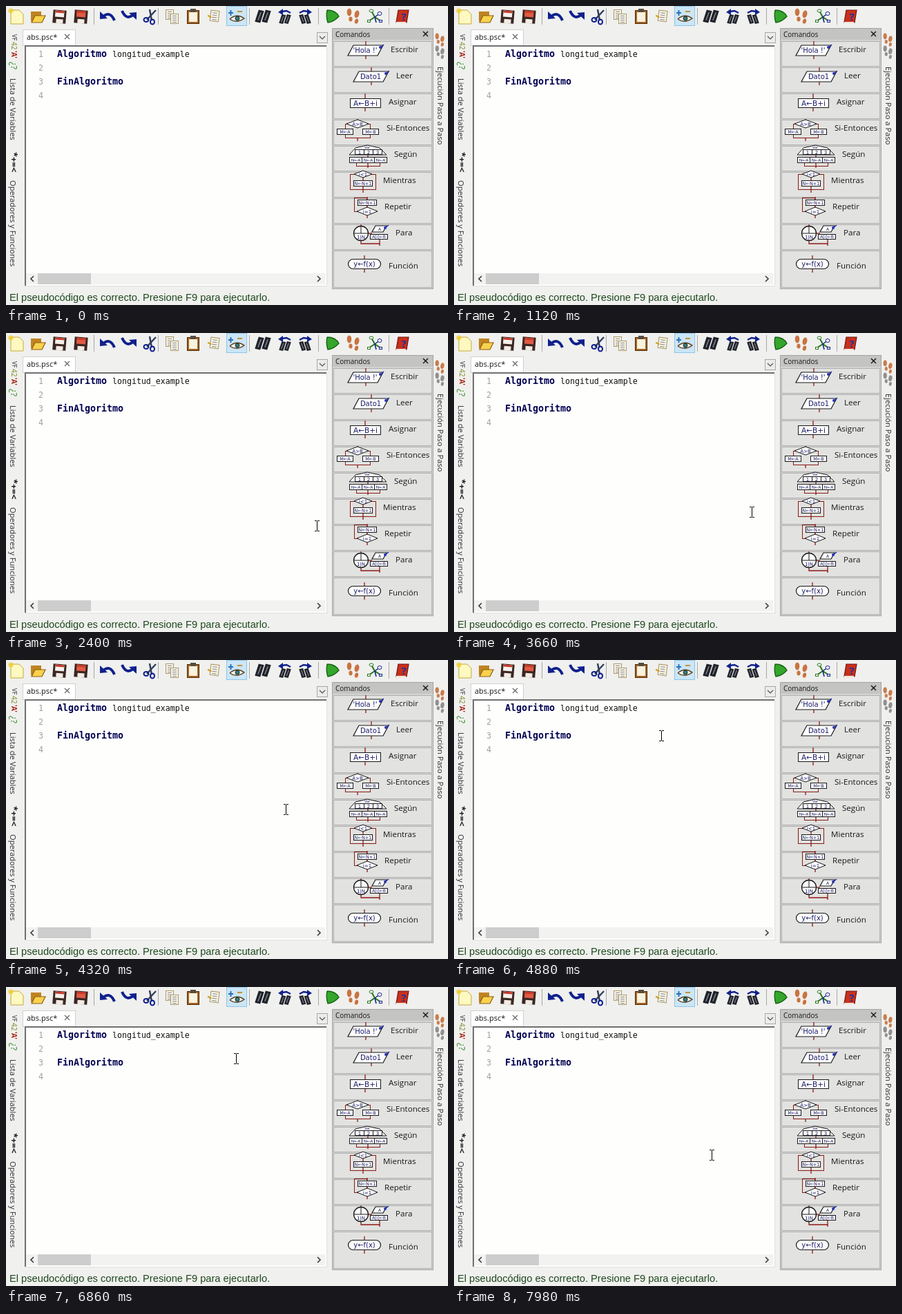
Write an HTML page with a canvas that moves like this. It is 640 px wide and 434 px high and loops after 8000 ms.

```html
<!DOCTYPE html>
<html lang="es">
<head>
<meta charset="utf-8">
<title>Editor de pseudocódigo</title>
<style>
html, body { margin: 0; width: 100%; height: 100%; overflow: hidden; background: #f0f0ee; }
canvas { display: block; width: 640px; height: 434px; }
</style>
</head>
<body>
<canvas id="stage" width="640" height="434"></canvas>
<script>
const ctx = document.getElementById('stage').getContext('2d');
const UI = '"Open Sans", sans-serif';
const MONO = '"DejaVu Sans Mono", monospace';
const ICON = '"DejaVu Sans", sans-serif';
const LOOP = 8000;
const RED = '#8c1a14', NAVY = '#10208c', INK = '#18181c', PAPER = '#fdfdfa';

function box(x, y, w, h, fill, edge) {
  if (fill) { ctx.fillStyle = fill; ctx.fillRect(x, y, w, h); }
  if (edge) { ctx.strokeStyle = edge; ctx.lineWidth = 1; ctx.strokeRect(x + .5, y + .5, w - 1, h - 1); }
}
function paint(fill, edge, width = 1) {
  if (fill) { ctx.fillStyle = fill; ctx.fill(); }
  if (edge) { ctx.strokeStyle = edge; ctx.lineWidth = width; ctx.stroke(); }
}
function trace(p) {
  ctx.beginPath();
  for (let i = 0; i < p.length; i += 2) ctx.lineTo(p[i], p[i + 1]);
}
function line(p, color = INK, width = 1) { trace(p); paint(null, color, width); }
function poly(p, fill, edge, width) { trace(p); ctx.closePath(); paint(fill, edge, width); }
function oval(x, y, rx, ry, fill, edge, width) {
  ctx.beginPath(); ctx.ellipse(x, y, rx, ry, 0, 0, 7); paint(fill, edge, width);
}
function text(s, x, y, size, color = INK, font = UI, weight = '', align = 'left') {
  ctx.font = `${weight} ${size}px ${font}`;
  ctx.fillStyle = color; ctx.textAlign = align;
  ctx.fillText(s, x, y);
}
function at(x, y, draw, turn = 0, sx = 1, sy = sx) {
  ctx.save(); ctx.translate(x, y); ctx.rotate(turn); ctx.scale(sx, sy);
  draw(); ctx.restore();
}
const down = (s, x, y, size = 11.1, color = '#2c2c34', weight = '') =>
  at(x, y, () => text(s, 0, 0, size, color, UI, weight), Math.PI / 2);
const mirror = draw => () => at(0, 0, draw, 0, -1, 1);
const slantBox = (x, y, w, h, lean, fill, edge) =>
  poly([x + lean, y, x + w, y, x + w - lean, y + h, x, y + h], fill, edge, 1.2);

// Toolbar icons, each around its own centre
function page() {
  poly([-8, -9, 4, -9, 10, -3, 10, 11, -8, 11], '#fdf9c0', '#c8a838');
  for (let i = 0; i < 4; i++) at(-8, -8, () => line([-4, 0, 4, 0], '#f0cc30', 1.4), i * Math.PI / 4);
}
function folder() {
  box(-10, -7, 15, 14, '#c08420');
  slantBox(-9, -1, 20, 10, 5, '#f8d24c', '#8c5c10');
}
const disk = label => () => at(0, 0, () => {
  box(-9, -9, 19, 19, '#3a2622');
  box(-6, -8, 13, 9, label);
  box(-6, -8, 13, 3, '#c43a2c');
  box(-4, 4, 10, 6, '#f2ece4');
}, .08);
function undo() {
  ctx.beginPath(); ctx.moveTo(-6, 0); ctx.quadraticCurveTo(4, -8, 10, 6);
  paint(null, NAVY, 4);
  poly([-11, -7, -11, 4, 0, 3], NAVY);
}
const redo = () => at(0, -2, undo, Math.PI);
function scissors() {
  line([8, -9, -5, 5], '#303c5c', 2.4); line([-1, -10, 2, 6], '#303c5c', 2.4);
  oval(-6, 5, 3.5, 3, null, NAVY, 2); oval(3, 8, 3, 3.5, null, NAVY, 2);
}
function sheet(x, y) {
  box(x, y, 12, 15, '#f8f4e0', '#a89870');
  for (let i = 3; i < 13; i += 3) line([x + 3, y + i + .5, x + 9, y + i + .5], '#8484a0');
}
const copy = () => { sheet(-9, -10); sheet(-2, -4); };
const list = () => at(0, 0, () => { sheet(-6, -8); line([-9, 0, -4, 2], '#d0a020', 2); }, .12, 1.1);
function paste() {
  box(-9, -9, 18, 20, '#a8641c', '#4b2808');
  box(-6, -6, 12, 14, '#f8f2e0'); box(-4, -11, 8, 5, '#584c3c');
}
function eye() {
  line([-11, -5, -4, -5], '#2b70b8', 2); line([-7.5, -9, -7.5, -1], '#2b70b8', 2);
  line([2, -7, 9, -7], '#c89030', 2);
  ctx.beginPath(); ctx.moveTo(-9, 4); ctx.quadraticCurveTo(1, -5, 12, 3);
  ctx.quadraticCurveTo(1, 11, -9, 4); paint('#f8f4ea', '#5a4022', 1.4);
  oval(2, 3, 3, 3, '#347c7a', '#18302c');
}
function binoculars() {
  for (const x of [-5, 5]) at(x, 0, () => {
    slantBox(-5, -9, 10, 18, 2, '#20222a');
    line([1, -6, -1, 6], '#868a94', 1.4);
  }, .2);
}
function seek() {
  at(1, 4, binoculars, 0, .75);
  line([9, -5, 3, -8, -3, -7], NAVY, 2.4);
  poly([-9, -6, -2, -11, -2, -2], NAVY);
}
function play() {
  ctx.beginPath(); ctx.moveTo(-7, -9); ctx.quadraticCurveTo(5, -9, 10, 0);
  ctx.quadraticCurveTo(3, 8, -6, 9); ctx.quadraticCurveTo(-9, 0, -7, -9);
  paint('#35a52c', '#176413', 1.4);
}
const foot = color => () => { oval(-1, -4, 3.3, 5.5, color); oval(1, 6, 2.6, 3.6, color); };
const feet = () => { at(-5, -2, foot('#c87440')); at(5, 1, foot('#c87440'), .25); };
function chart() {
  line([-5, -8, 0, 1, 9, 7], '#26751e', 2); line([0, 1, -9, 7], '#26751e', 2);
  line([0, 1, 2, 9], NAVY, 1.6); line([0, 1, 7, -4], NAVY, 1.4);
  oval(-5, -8, 3, 2, PAPER, '#26751e'); oval(7, -4, 3, 2.5, PAPER, NAVY);
  box(-11, 5, 5, 4, PAPER, '#26751e'); box(6, 5, 5, 4, PAPER, NAVY);
}
function help() {
  slantBox(-9, -9, 18, 18, 3, '#c8301c', '#701510');
  box(-9, 8, 14, 2, '#f2e7da');
  text('?', 2, 6, 15, '#2030a0', UI, 'bold', 'center');
}
const groups = [
  [15, page, folder, disk('#f6f0ea'), disk('#e05a44')],
  [147, undo, redo, scissors],
  [240, copy, paste, list, eye],
  [372, binoculars, seek, mirror(seek)],
  [472, play, feet, chart],
  [574, help]
];
function toolbar() {
  box(319, 0, 30, 29, '#cbe6f6', '#8cc4e8');
  groups.forEach(([x, ...icons], g) => {
    if (g) line([x - 19.5, 3, x - 19.5, 27], '#a8a8a8');
    icons.forEach((icon, i) => at(x + i * 31, 15, icon));
  });
}

// Flowchart pieces
const note = (s, x, y, size) => text(s, x, y + size * .36, size, '#1c1c70', ICON, '', 'center');
const wire = (...p) => line(p, RED, 1.3);
function diamond(x, y, w, h, s) {
  poly([x - w, y, x, y - h, x + w, y, x, y + h], PAPER, INK);
  note(s, x, y, 7);
}
function cell(x, y, w, h, s, size = 6.5) {
  box(x, y, w, h, PAPER, INK);
  note(s, x + w / 2, y + h / 2, size);
}
function pen(x, y) {
  line([x, y, x + 6, y - 5], '#2432b8', 1.4);
  oval(x + 1, y - 1, 2, 2, '#2432b8');
}
function inOut(s) {
  wire(26, -12, 26, 14);
  slantBox(0, -6, 51, 15, 8, PAPER, INK);
  note(s, 25, 1.5, 10);
  pen(46, -2);
}
function assign() {
  wire(22, -12, 22, 14);
  cell(0, -5, 45, 14, 'A←B+i', 10.5);
}
function branch() {
  box(12, -6, 37, 21, null, RED); wire(30, -13, 30, -6); wire(30, 15, 30, 19);
  diamond(30, -6, 16, 6, 'A>B');
  cell(0, 1, 24, 9, 'M←A'); cell(37, 1, 24, 9, 'M←B');
}
function choose() {
  poly([0, 1, 9, -9, 26, -13, 44, -9, 54, 1], PAPER, INK);
  note('Var', 26, -10, 5);
  box(10, 12, 35, 6, null, RED); wire(27, 1, 27, 20);
  for (let i = 0; i < 3; i++) {
    cell(8 + i * 13, -7, 14, 8, i + 1, 7);
    cell(i * 18, 4, 19, 9, 'N←A', 6);
  }
}
function whileLoop() {
  box(0, -9, 38, 23, null, RED); wire(19, -14, 19, 18);
  diamond(19, -9, 13, 5, 'i<1'); cell(5, 0, 28, 9, 'N←N+1');
}
function repeat() {
  box(0, -13, 19, 21, null, RED); wire(19, -14, 19, 17);
  cell(5, -10, 28, 9, 'N←N+1'); diamond(19, 7, 15, 6, 'i=1');
}
function forLoop() {
  wire(11, -12, 11, 16, 38, 16, 38, 10); wire(22, 1, 27, 1); wire(38, 16, 38, 19);
  oval(11, 1, 10.5, 10.5, PAPER, INK, 1.3);
  line([0, 1, 22, 1]); line([11, -10, 11, 1]);
  note('1|N', 11, 6, 7);
  slantBox(27, -10, 21, 9, 5, PAPER, INK); note('A', 38, -5, 6); pen(45, -6);
  cell(24, 2, 26, 8, 'A[i]←B', 6);
}
function call() {
  wire(24, -15, 24, 10);
  ctx.beginPath(); ctx.roundRect(.5, -9.5, 47, 14, 7); paint(PAPER, INK, 1.2);
  note('y←f(x)', 24, -3, 10);
}
const commands = [
  ['Escribir', 51, () => inOut("'Hola !'")], ['Leer', 51, () => inOut('Dato1')],
  ['Asignar', 45, assign], ['Si-Entonces', 61, branch], ['Según', 54, choose],
  ['Mientras', 37, whileLoop], ['Repetir', 33, repeat], ['Para', 50, forLoop], ['Función', 48, call]
];

function panel(mouse) {
  box(472, 32, 147, 379, '#d4d4d4', '#a4a4a4');
  box(473, 33, 145, 16, '#c4c4c2');
  text('Comandos', 477, 45, 10);
  line([604, 37, 611, 44], INK, 1.5); line([611, 37, 604, 44], INK, 1.5);
  commands.forEach(([name, width, icon], i) => {
    const last = i === commands.length - 1;
    const y = 51 + 38 * i, h = last ? 54 : 37, base = y + (last ? 26 : 16);
    const over = mouse && mouse.x > 474 && mouse.x < 617 && mouse.y >= y && mouse.y < y + h;
    box(474, y, 143, h, over ? '#e0f3f9' : '#e2e2e0', over ? '#6fc0e8' : '#b0b0b0');
    // Icon and label share the row, centred together
    ctx.font = `11.6px ${UI}`;
    const left = Math.round(546 - (width + 11 + ctx.measureText(name).width) / 2);
    at(left, base - 4, icon);
    text(name, left + width + 11, base, 11.6);
  });
}

function sideBars() {
  down('VF', 9, 41, 8.5); down('42', 8, 52, 10, '#708c1c');
  down("'A'", 8, 65, 10, '#a82c1c', 'bold'); down('¿?', 7, 81, 13, '#2d8a2a');
  down('Lista de Variables', 6, 105);
  down('*+=<', 7, 212, 13, '#1c1c20', 'bold');
  down('Operadores y Funciones', 6, 253);
  down('Ejecución Paso a Paso', 625, 88);
  ['#c87c4c', '#909090'].forEach((color, i) => {
    at(625, 47 + i * 18, foot(color), 0, .8);
    at(632, 51 + i * 18, foot(color), .2, .8);
  });
}

function editor() {
  box(24, 34, 77, 24, '#fff', '#d0d0d0');
  box(27, 57, 438, 350, '#fefefd', '#e0e0e0');
  box(27, 57, 437, 2, '#707070'); box(27, 57, 2, 349, '#707070');
  text('abs.psc*', 30, 49, 11);
  line([85, 41, 92, 48], '#686868', 1.2); line([92, 41, 85, 48], '#686868', 1.2);
  box(450, 38, 16, 16, '#ececec', '#a8a8a8');
  line([454, 44, 458, 48, 462, 44], '#505050', 1.2);
  for (let i = 0; i < 4; i++) text(i + 1, 54, 73.5 + i * 20, 11.6, '#a0a0a0', MONO, '', 'right');
  text('Algoritmo', 74, 74, 13.3, '#000050', MONO, 'bold');
  text('longitud_example', 154, 74, 11.6, '#101010', MONO);
  text('FinAlgoritmo', 74, 114, 13.3, '#000050', MONO, 'bold');
  box(29, 388, 433, 16, '#f2f2f0');
  box(46, 388, 77, 16, '#cdcdcd');
  line([40, 392, 36, 396, 40, 400], '#404040', 1.7);
  line([451, 392, 455, 396, 451, 400], '#404040', 1.7);
}

function stepAt(t) {
  const beat = (t + 20) % 140;
  return 3 * Math.floor((t + 20) / 140) + Math.min(2, Math.floor(beat / 20));
}

// Pointer stops: step, x, y
const stops = [[36, 640, 434], [44, 562, 357], [53, 450, 280], [71, 456, 260], [80, 431, 260],
  [89, 425, 237], [105, 300, 110], [125, 284, 76], [128, 283, 87], [143, 324, 71], [161, 373, 244]];

function pointer(step) {
  if (step < stops[0][0]) return null;
  const next = stops.findIndex(s => s[0] > step);
  const b = stops.at(next), a = next < 0 ? b : stops[next - 1];
  const u = a === b ? 0 : (step - a[0]) / (b[0] - a[0]);
  const ease = u * u * (3 - 2 * u);
  return { x: Math.round(a[1] + (b[1] - a[1]) * ease), y: Math.round(a[2] + (b[2] - a[2]) * ease) };
}
function arrow() {
  poly([.5, .5, .5, 16.5, 4, 13, 7, 19, 9.5, 18, 6.8, 12, 11.5, 12], '#fff', '#000');
}
function beam() {
  for (const y of [-8, 7]) { box(-3, y, 3, 1, '#000'); box(1, y, 3, 1, '#000'); }
  box(0, -7, 1, 14, '#000');
}

function draw(t) {
  const mouse = pointer(stepAt(t));
  box(0, 0, 640, 434, '#f0f0ee');
  toolbar();
  sideBars();
  editor();
  panel(mouse);
  text('El pseudocódigo es correcto. Presione F9 para ejecutarlo.', 5, 428, 14.67, '#1c481c',
    '"Liberation Sans", sans-serif');
  if (mouse) at(mouse.x, mouse.y, mouse.x < 466 ? beam : arrow);
}

const start = performance.now();
function play8s() {
  draw((performance.now() - start) % LOOP);
  requestAnimationFrame(play8s);
}
play8s();
</script>
</body>
</html>
```
